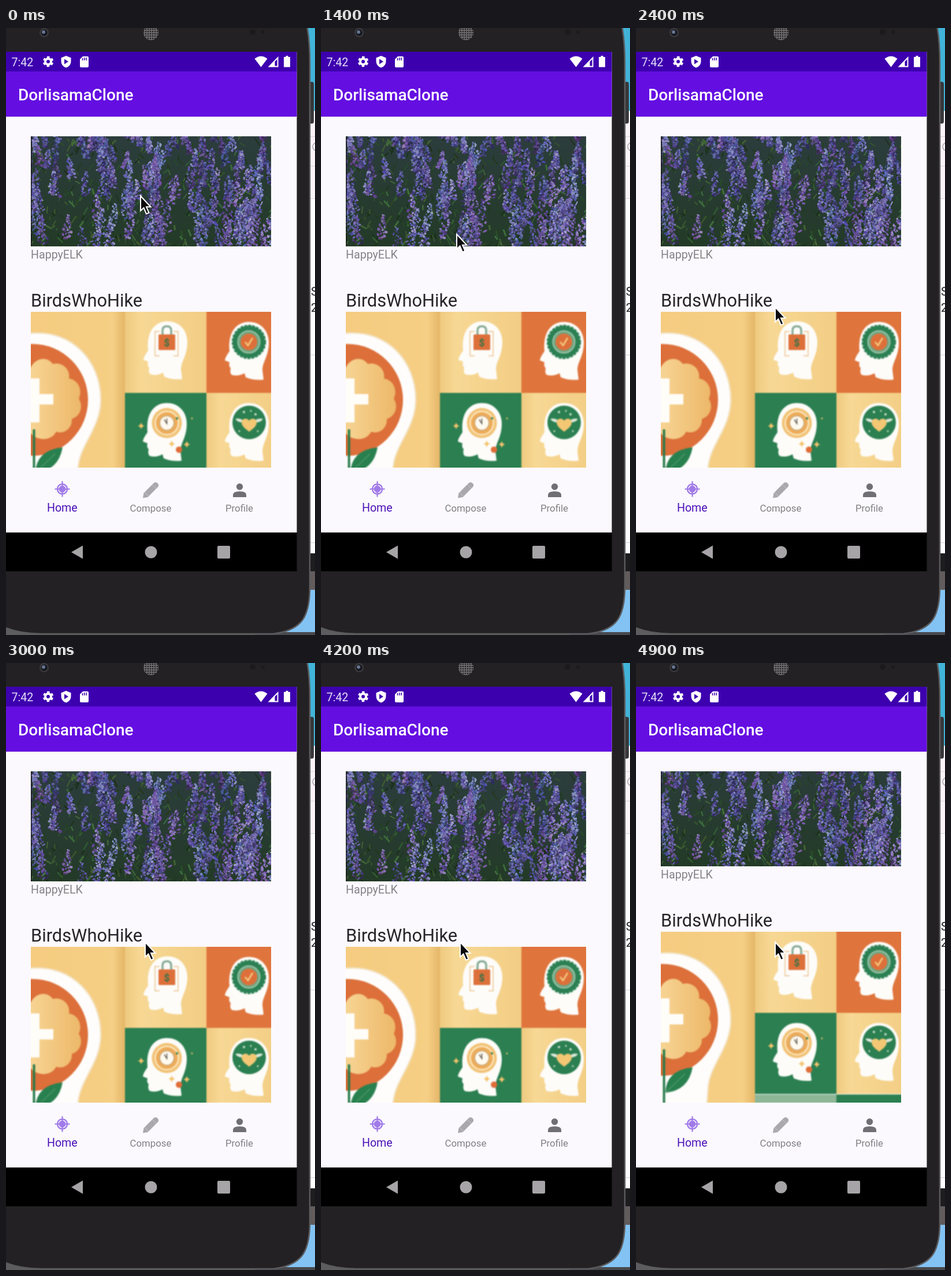
An HTML page with a canvas for the animation above (5 s loop, 535x1048 px).

```html
<!DOCTYPE html>
<html lang="en">
<head>
<meta charset="utf-8">
<title>Photo feed</title>
<style>
html, body { margin: 0; width: 535px; height: 1048px; overflow: hidden; background: #fdfcfe; }
svg, canvas, .view, .feed, .photo { position: absolute; left: 0; top: 0; display: block; }
text { font-family: Roboto, sans-serif; }
.view { left: 43px; top: 187px; width: 416px; height: 572px; overflow: hidden; }
.feed { width: 416px; height: 640px; animation: scroll 5s step-end infinite; }
.photo { width: 416px; height: 190px; overflow: hidden; }
canvas { left: -4px; top: -4px; filter: blur(.7px); }
.art { filter: blur(.9px); }
.cursor { animation: move 5s infinite; }
@keyframes scroll {
  0% { transform: none; }
  86% { transform: translateY(-1px); }
  88% { transform: translateY(-3px); }
  90% { transform: translateY(-5px); }
  92% { transform: translateY(-9px); }
  94% { transform: translateY(-14px); }
  96% { transform: translateY(-19px); }
  98%, 100% { transform: translateY(-26px); }
}
@keyframes move {
  0% { transform: translate(233px, 290px); }
  10% { transform: translate(233px, 290px); animation-timing-function: steps(9); }
  28% { transform: translate(235px, 356px); animation-timing-function: steps(10); }
  48%, 100% { transform: translate(241px, 482px); }
}
</style>
</head>
<body>
<svg width="535" height="1048" viewBox="0 0 535 1048">
  <defs>
    <pattern id="mesh" width="4" height="4" patternUnits="userSpaceOnUse">
      <rect width="4" height="4" fill="#6d6b6d"/><circle cx="2" cy="2" r="1.35" fill="#242224"/>
    </pattern>
  </defs>

  <!-- desktop behind the phone -->
  <rect x="500" width="35" height="143" fill="#42b3d8"/>
  <rect x="500" y="143" width="35" height="152" fill="#faf4f8"/>
  <path d="M525 187.500h10M525 238.500h10M525 294.500h10M525 564.500h10M525 888.500h10" stroke="#d8d4d9"/>
  <circle cx="538" cy="205" r="7" fill="none" stroke="#aaa7ad" stroke-width="1.500"/>
  <g font-size="20" fill="#222126"><text x="528" y="462">S</text><text x="528" y="490">2</text></g>
  <rect x="500" y="907" width="35" height="34" fill="#1d1c1f"/>
  <rect x="500" y="938" width="35" height="33" fill="#625c5c"/>
  <rect x="430" y="970" width="105" height="73" fill="#82c3f3"/>
  <rect y="1036" width="430" height="12" fill="#5d5d60"/>
  <rect x="430" y="1043" width="105" height="5" fill="#48494d"/>

  <!-- phone -->
  <path d="M524 93h6q3 0 3 4v64q0 4-3 4h-6z" fill="#38373a"/>
  <path d="M-9-9H520Q526 20 526 60V965C526 1016 513 1040 462 1046H60Q20 1046-9 1032Z" fill="#232123" stroke="#5b5a5d" stroke-width="2.500"/>
  <circle cx="66" cy="8" r="8" fill="#3a393c"/><circle cx="66" cy="8" r="5.500" fill="#151720"/><circle cx="65" cy="7" r="3" fill="#66758f"/>
  <circle cx="251" cy="8" r="13" fill="url(#mesh)"/>
  <circle cx="427" cy="7" r="5" fill="#1b1a1c"/><circle cx="445" cy="7" r="3" fill="#1b1a1c"/>

  <!-- screen -->
  <rect y="41" width="503.500" height="830" fill="#fbf9fd"/>
  <rect y="41" width="503.500" height="34" fill="#3d00af"/>
  <rect y="75" width="503.500" height="78" fill="#640ee2"/>
  <rect y="153" width="503.500" height="1.500" fill="#ebe7ef"/>
  <rect y="871" width="503.500" height="67"/>
  <text x="9.500" y="66" font-size="19.600" fill="#e9dffa">7:42</text>
  <g fill="#fff">
    <g fill="none" stroke="#fff">
      <circle cx="73" cy="58" r="5" stroke-width="4"/>
      <circle cx="73" cy="58" r="7.800" stroke-width="2.800" stroke-dasharray="4.400 3.768" transform="rotate(14 73 58)"/>
    </g>
    <path d="M104 48l8.500 3.500v6q0 8-8.500 11q-8.500-3-8.500-11v-6z"/>
    <path d="M101 53.500l7 4.500-7 4.500z" fill="#3d00af"/>
    <path d="M133 49h8q2 0 2 2v15q0 2-2 2h-11q-2 0-2-2v-12z"/>
    <path d="M132.500 52v4M135.700 51v5M139 51v5" stroke="#3d00af" stroke-width="1.500"/>
    <path d="M430.500 53q11-8.500 22 0L441.500 67.500z"/>
    <path d="M471.500 49v18.500h-18z"/><path d="M469.500 54v11.500h-4v-7.500z" fill="#3d00af"/>
    <path d="M484.500 48h4v2h3.500v17.500h-11V50h3.500z"/>
  </g>
  <text x="21" y="125" font-size="28" font-weight="500" fill="#fff">DorlisamaClone</text>

  <!-- tabs -->
  <g fill="none" stroke="#a17be9">
    <circle cx="97.500" cy="796" r="8.500" stroke-width="2.500"/>
    <circle cx="97.500" cy="796" r="5.500" fill="#a17be9"/>
    <path d="M97.500 782.500v27M84.500 796h26" stroke-width="2.200"/>
  </g>
  <g transform="translate(237 811.500) rotate(-45)" fill="#aaa8ac">
    <path d="M0 0l7-5h24q5 0 5 5t-5 5H7z"/><path d="M9-5v10M28-5v10" stroke="#c1bfc3"/>
  </g>
  <g fill="#707074"><circle cx="404.500" cy="792" r="5.700"/><path d="M393 810v-4q0-6 11.500-6t11.500 6v4z"/></g>
  <g text-anchor="middle" font-size="16.800" fill="#808084">
    <text x="97.300" y="835" font-size="19.600" fill="#4c12b8">Home</text>
    <text x="250.500" y="835">Compose</text>
    <text x="404" y="835">Profile</text>
  </g>
  <g fill="#a6a4a6">
    <path d="M113 905l20-11.500v23z"/><circle cx="251" cy="905" r="10.500"/><rect x="366" y="894" width="22" height="22" rx="2"/>
  </g>
</svg>

<div class="view"><div class="feed">
  <div class="photo"><canvas width="424" height="198"></canvas></div>
  <svg width="416" height="640" viewBox="43 187 416 640">
    <defs>
      <linearGradient id="sand">
        <stop offset="0" stop-color="#f5cc80"/><stop offset=".88" stop-color="#f5cf85"/><stop offset="1" stop-color="#e4b667"/>
      </linearGradient>
      <linearGradient id="cream"><stop offset="0" stop-color="#efca80"/><stop offset=".2" stop-color="#f7d894"/><stop offset="1" stop-color="#f3cd84"/></linearGradient>
      <linearGradient id="brain"><stop offset="0" stop-color="#f8d798"/><stop offset="1" stop-color="#edb869"/></linearGradient>
      <clipPath id="frame"><path d="M43 490h416v337H43z"/></clipPath>
      <path id="head" fill="#fdfcf9" d="M279 506.500C300 506 314 522 314 542C314 566 303 575 303 590L305 606Q288 608 274 602L272 595Q261 601 250 598Q246 595 248 586Q244 583 246 576L238 573Q238 568 246 557C243 526 256 507 279 506.500Z"/>
      <path id="spark" fill="#f4c36d" d="M0-6Q1-1 6 0Q1 1 0 6Q-1 1-6 0Q-1-1 0-6"/>
    </defs>
    <rect x="43" y="187" width="1.200" height="190" fill="#0b0d0c"/>
    <text x="43" y="398" font-size="19.600" fill="#838287">HappyELK</text>
    <text x="43" y="481" font-size="30.800" fill="#252428">BirdsWhoHike</text>

    <g clip-path="url(#frame)"><g class="art">
      <rect x="33" y="480" width="173" height="357" fill="url(#sand)"/>
      <path d="M30 527H43C115 521 164 575 164 642C164 690 129 718 125 757L119 837H30Z" fill="#fefdfb" stroke="#f3e3c6" stroke-width="2.500"/>
      <circle cx="45.500" cy="642" r="96.500" fill="#dc6f3a"/>
      <path d="M33 586H43C52 568 72 567 81 580C98 576 112 590 109 605C126 608 133 626 126 640C135 654 128 671 114 675C115 691 101 702 87 697C78 714 54 713 43 700H33Z" fill="url(#brain)"/>
      <path d="M33 605h25v27h24v18H58v31H33z" fill="#fffdf8"/>
      <path d="M46.500 693h4v144h-4z" fill="#267a4a"/>
      <path d="M51 768Q52 729 98 724Q91 764 51 768Z" fill="#29804f"/>
      <path d="M51 768L85 735" stroke="#74ae86" fill="none"/>

      <rect x="206" y="480" width="141" height="150" fill="url(#cream)"/>
      <rect x="347" y="480" width="122" height="150" fill="#df743c"/>
      <rect x="206" y="630" width="141" height="140" fill="#2b7f51"/>
      <rect x="347" y="630" width="122" height="140" fill="url(#cream)"/>
      <rect x="206" y="771" width="141" height="66" fill="#8eb798"/>
      <rect x="347" y="771" width="122" height="66" fill="#2b7f51"/>
      <use href="#head"/><use href="#head" x="141" y="1"/><use href="#head" x="-1" y="141"/><use href="#head" x="141" y="141"/>

      <path d="M266 524h-8v42h8M290 524h8v42h-8" fill="none" stroke="#ecc08a" stroke-width="1.500"/>
      <path d="M271 530v-8q0-7 7.500-7t7.500 7v8" fill="none" stroke="#83a993" stroke-width="3.500"/>
      <rect x="264" y="529" width="29" height="27" rx="1.500" fill="#dd703a"/>
      <text x="278.500" y="549" text-anchor="middle" font-size="17" font-weight="700" fill="#28704a">$</text>

      <circle cx="420.500" cy="542" r="28" fill="#2b8053"/>
      <circle cx="420.500" cy="542" r="28.500" fill="none" stroke="#2b8053" stroke-width="2.500" stroke-dasharray="5 2"/>
      <circle cx="420.500" cy="542" r="19" fill="#6da683" stroke="#a3c8aa" stroke-width="2"/>
      <circle cx="420.500" cy="542" r="14.500" fill="#dd703a"/>
      <path d="M414 542l5 6 8-13" fill="none" stroke="#f7cf83" stroke-width="2.500"/>

      <circle cx="278.500" cy="682" r="26" fill="#f1c377"/>
      <circle cx="278.500" cy="682" r="20" fill="#edac59" stroke="#fff1d4" stroke-width="2"/>
      <circle cx="278.500" cy="682" r="12.500" fill="#fffaf0" stroke="#cfa875" stroke-width="2"/>
      <path d="M274 676l4.500 7v-9" fill="none" stroke="#555048" stroke-width="1.500"/>
      <use href="#spark" x="313" y="719"/><use href="#spark" x="287" y="718"/><use href="#spark" x="234" y="687"/>
      <circle cx="299.500" cy="728" r="5.500" fill="#df6d39"/>
      <circle cx="296" cy="674" r="2" fill="#2b7f51"/><circle cx="322" cy="674" r="1.500" fill="#f4c36d"/>

      <circle cx="421" cy="681" r="29" fill="#2b7f51"/>
      <path d="M410 681q-9 0-13-6q8-2 13 2zM432 681q9 0 13-6q-8-2-13 2z" fill="#dbe8d8"/>
      <path d="M421 697C413 691 408 687 408 681C408 674 417 672 421 678C425 672 434 674 434 681C434 687 429 691 421 697Z" fill="#f3c773"/>
      <g fill="#d6e6d5"><circle cx="412" cy="663" r="2"/><circle cx="424" cy="661" r="1.500"/><circle cx="432" cy="667" r="2"/><circle cx="404" cy="696" r="1.500"/><circle cx="436" cy="696" r="1.500"/></g>
    </g></g>
  </svg>
</div></div>

<svg width="535" height="1048" viewBox="0 0 535 1048">
  <path class="cursor" d="M0 0V25.500L5.500 20.500L10 31L14.500 29L10 18.800H17.500Z" fill="#0b0a0c" stroke="#fff" stroke-width="2"/>
</svg>

<script>
// Abstract lupin meadow: soft ground, leaf strokes and loose flower spikes.
const g = document.querySelector('canvas').getContext('2d');
let seed = 41;
const rnd = () => (seed = (seed * 16807) % 2147483647) / 2147483647;
const mix = (a, b) => a + (b - a) * rnd();

const ground = g.createLinearGradient(0, 0, 0, 198);
ground.addColorStop(0, '#2c3d3d');
ground.addColorStop(1, '#233a27');
g.fillStyle = ground;
g.fillRect(0, 0, 424, 198);

for (let i = 0; i < 420; i++) {
  const x = mix(0, 424), y = mix(0, 205);
  g.strokeStyle = `hsl(${mix(98, 130)} 30% ${mix(12, 34)}%)`;
  g.lineWidth = mix(1, 3.5);
  g.beginPath();
  g.moveTo(x, y);
  g.lineTo(x + mix(-10, 10), y - mix(4, 13));
  g.stroke();
}

function spike(x, y, h, hue, light) {
  const petals = 34, lean = mix(-6, 6);
  for (let k = 0; k < petals; k++) {
    const p = k / petals, w = 1.5 + h * .17 * Math.sqrt(p);
    g.fillStyle = `hsl(${hue + mix(-9, 9) + p * 8} ${mix(22, 40)}% ${light + mix(-17, 14) - p * 5}%)`;
    g.beginPath();
    g.ellipse(x + lean * (1 - p) + mix(-w, w), y + p * h, mix(1.2, 2 + p * 2.2), mix(1.2, 2.4), mix(-1, 1), 0, 7);
    g.fill();
  }
}
for (let i = 0; i < 170; i++) {
  const y = i * 1.1 - 22, x = mix(-6, 430);
  if (x < 170 && y > 70 && rnd() < .5) continue;
  spike(x, y, 24 + y * .13 + mix(0, 14), mix(226, 258), mix(39, 60) + y * .02);
}
</script>
</body>
</html>
```
